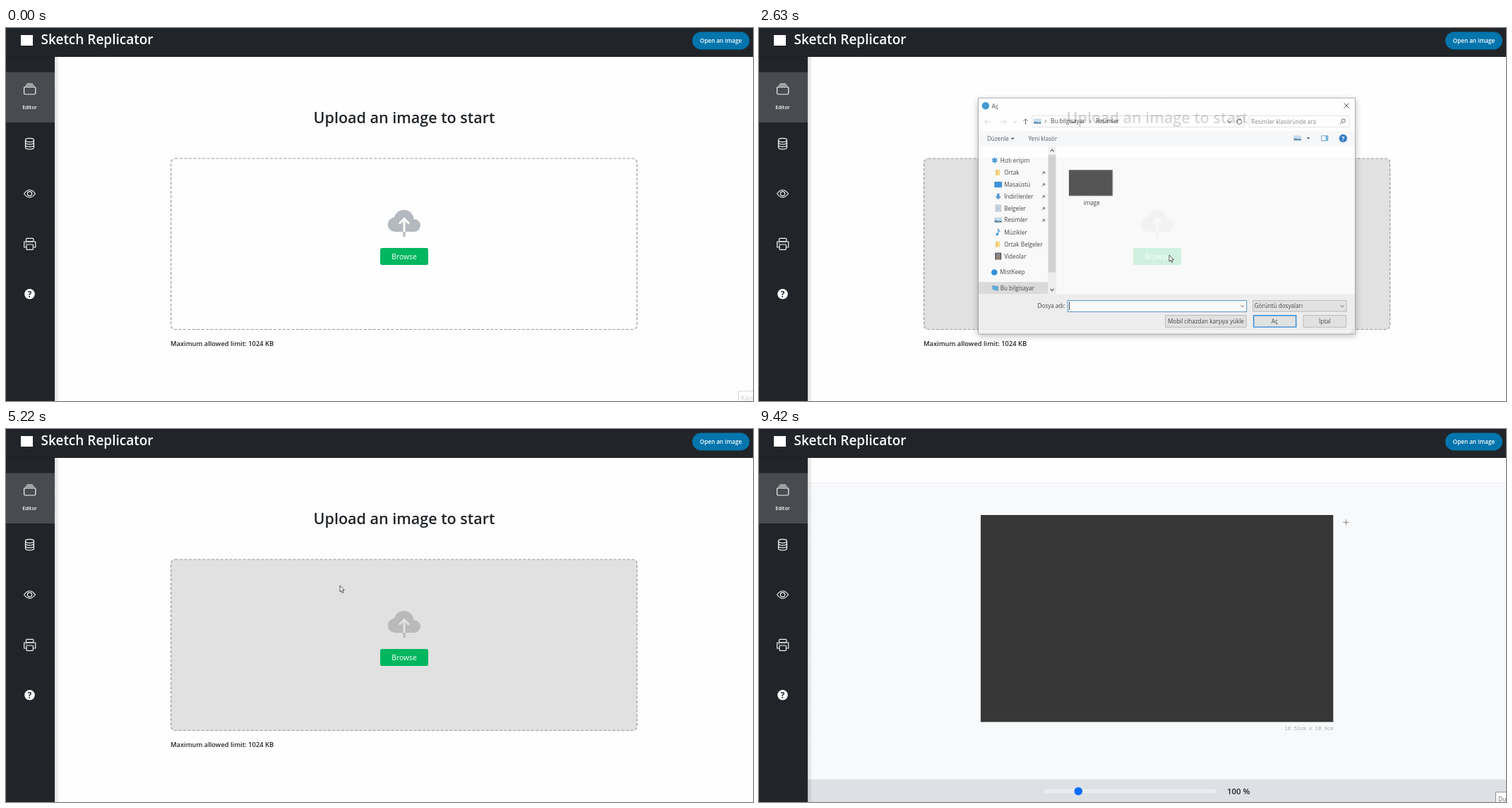
An HTML page with a canvas that plays this animation: 1058 by 529 pixels, repeating every 9500 ms.

```html
<!DOCTYPE html>
<html lang="en">
<head>
<meta charset="utf-8">
<title>Image upload walkthrough</title>
<style>
html, body { margin: 0; width: 100%; height: 100%; overflow: hidden; background: #fefefe; }
canvas { display: block; }
</style>
</head>
<body>
<canvas id="stage" width="1058" height="529"></canvas>
<script>
const stage = document.getElementById('stage').getContext('2d');
const layer = new OffscreenCanvas(1058, 529).getContext('2d');
let ctx = stage;
const LOOP = 9500;
const SANS = '"Open Sans", "Noto Sans", sans-serif';
const MONO = '"Noto Sans Mono", "DejaVu Sans Mono", monospace';
const DARK = '#212529';

const clamp = v => Math.max(0, Math.min(1, v));
const span = (t, a, b) => clamp((t - a) / (b - a));
const smooth = p => p * p * (3 - 2 * p);
const mix = (a, b, p) => a + (b - a) * p;
const within = (t, a, b) => t >= a && t < b;

// ---------- drawing helpers ----------
function rect(x, y, w, h, fill, stroke, radius = 0, line = 1) {
  ctx.beginPath();
  ctx.roundRect(x, y, w, h, radius);
  if (fill) { ctx.fillStyle = fill; ctx.fill(); }
  if (stroke) { ctx.strokeStyle = stroke; ctx.lineWidth = line; ctx.stroke(); }
}
function disc(x, y, r, fill) {
  ctx.beginPath();
  ctx.arc(x, y, r, 0, Math.PI * 2);
  ctx.fillStyle = fill;
  ctx.fill();
}
function path(points, stroke, line = 1, fill) {
  ctx.beginPath();
  points.forEach(([x, y], i) => i ? ctx.lineTo(x, y) : ctx.moveTo(x, y));
  if (fill) { ctx.closePath(); ctx.fillStyle = fill; ctx.fill(); }
  if (stroke) { ctx.strokeStyle = stroke; ctx.lineWidth = line; ctx.stroke(); }
}
// y is the middle of the capitals
function text(str, x, y, size, color, weight = 400, align = 'left', family = SANS) {
  ctx.font = `${weight} ${size}px ${family}`;
  ctx.textAlign = align;
  ctx.fillStyle = color;
  ctx.fillText(str, x, y + size * 0.36);
}
const label = (str, x, y, align, color = '#222') => text(str, x, y, 8.2, color, 400, align);
function chevron(x, y, color = '#555', dx = 2.5, dy = 1.5) {
  path([[x - dx, y - dy], [x, y + dy], [x + dx, y - dy]], color);
}
const chevronRight = (x, y) => path([[x - 1, y - 2.2], [x + 1.2, y], [x - 1, y + 2.2]], '#555');
const triangle = (x, y) => path([[x - 2.3, y - 1], [x + 2.3, y - 1], [x, y + 1.6]], null, 1, '#333');
function arrowIcon(x, y, angle, color) {
  ctx.save();
  ctx.translate(x, y);
  ctx.rotate(angle);
  path([[-4, 0], [4, 0]], color);
  path([[1, -3], [4, 0], [1, 3]], color);
  ctx.restore();
}

// ---------- page frame ----------
function drawChrome() {
  const shade = ctx.createLinearGradient(69, 0, 76, 0);
  shade.addColorStop(0, 'rgba(0,0,0,.13)');
  shade.addColorStop(1, 'rgba(0,0,0,0)');
  ctx.fillStyle = shade;
  ctx.fillRect(69, 41, 7, 488);
  rect(0, 0, 1058, 41, DARK);
  rect(0, 40, 69, 489, DARK);
  rect(0, 40, 69, 1, '#1c2024');
  rect(0, 62.5, 69, 71.5, '#484c50');
  rect(21, 10, 17, 15, '#fff');
  text('Sketch Replicator', 49.5, 16.5, 19, '#fff', 600);
  rect(972, 5.5, 81, 25, '#0275ad', null, 12.5);
  text('Open an Image', 1012.5, 18, 8.1, '#fff', 600, 'center');

  const white = '#f4f4f4';
  rect(25.6, 83.6, 16.2, 10.4, null, white, 1.5, 1.2);
  path([[27.5, 81.3], [40, 81.3]], white, 1.1);
  path([[29.5, 79.2], [38, 79.2]], white, 1.1);
  text('Editor', 33.5, 112, 7.1, '#fff', 600, 'center');

  ctx.strokeStyle = white;
  ctx.lineWidth = 1.2;
  ctx.beginPath();
  ctx.ellipse(33.5, 159, 6, 2.6, 0, 0, Math.PI * 2);
  for (let y = 162.3; y < 171; y += 3.5) {
    ctx.moveTo(39.5, y);
    ctx.ellipse(33.5, y, 6, 2.6, 0, 0, Math.PI);
  }
  ctx.moveTo(27.5, 159); ctx.lineTo(27.5, 169.5);
  ctx.moveTo(39.5, 159); ctx.lineTo(39.5, 169.5);
  ctx.stroke();

  ctx.beginPath();
  ctx.moveTo(25.5, 235);
  ctx.quadraticCurveTo(33.5, 224.5, 41.5, 235);
  ctx.quadraticCurveTo(33.5, 245.5, 25.5, 235);
  ctx.moveTo(36.6, 235);
  ctx.arc(33.5, 235, 3.1, 0, Math.PI * 2);
  ctx.stroke();

  rect(28.5, 298.3, 10.4, 4.5, null, white, 1, 1.2);
  path([[29, 311], [25.7, 311], [25.7, 303], [41.7, 303], [41.7, 311], [38.5, 311]], white, 1.2);
  rect(29, 307, 9.4, 7.3, null, white, 1, 1.2);
  disc(28.4, 305.2, 0.7, white);

  disc(33.5, 377.3, 7.3, '#fff');
  text('?', 33.5, 377.5, 11.5, DARK, 700, 'center');
}

// ---------- upload page ----------
function drawUpload(zoneHover, buttonHover) {
  text('Upload an image to start', 564, 127, 21.5, DARK, 600, 'center');
  const back = zoneHover ? '#e1e1e1' : '#fefefe';
  const cloud = zoneHover ? '#bababa' : '#b3b9be';
  ctx.setLineDash([4, 2.4]);
  rect(233.7, 185, 660, 242.5, back, '#999', 6, 1.2);
  ctx.setLineDash([]);

  disc(551, 278.7, 10.2, cloud);
  disc(563.5, 272, 14, cloud);
  disc(578, 280, 9, cloud);
  rect(551, 276, 27, 13, cloud);
  rect(562.4, 288, 3.2, 8, cloud);
  path([[564, 271], [564, 289]], back, 3);
  path([[557, 277.5], [564, 270.5], [571, 277.5]], back, 3);

  rect(530, 312, 68, 24, buttonHover ? '#009c55' : '#00b65f', null, 2.5);
  text('Browse', 564, 324.5, 10.4, '#fff', 400, 'center');
  text('Maximum allowed limit: 1024 KB', 233, 447.5, 9.3, DARK, 600);
}

// ---------- editor page ----------
function drawEditor() {
  rect(69, 76, 989, 453, '#f8f9fb');
  rect(69, 76, 989, 1, '#eceef1');
  rect(314, 122, 499.3, 293.6, '#363736');
  path([[827.5, 132.3], [835.5, 132.3]], '#888');
  path([[831.5, 128.3], [831.5, 136.3]], '#888');
  text('18.52cm x 10.9cm', 813.5, 424.5, 7.2, '#a3a5a7', 400, 'right', MONO);
  rect(69, 497, 989, 32, '#dde1e6');
  rect(403, 510.7, 245, 6, '#eaedf0', null, 3);
  disc(452.3, 513.7, 5.8, '#0d6efd');
  text('100 %', 663, 514.3, 11.4, DARK, 600);
}

// ---------- file dialog ----------
function pictureIcon(x, y) {
  rect(x - 5, y - 3.5, 10, 7, '#b9d9ee', '#c4cacf', 0, 0.6);
  path([[x - 5, y + 3], [x - 5, y], [x + 1, y + 1.2], [x + 5, y + 0.5], [x + 5, y + 3]], null, 1, '#3f6f93');
}
const treeIcons = {
  star(x, y) {
    for (let i = 0; i < 3; i++) {
      const a = i * Math.PI / 3 + 0.4, c = 4 * Math.cos(a), s = 4 * Math.sin(a);
      path([[x - c, y - s], [x + c, y + s]], '#2f8fdc', 2.2);
    }
  },
  folder(x, y) { rect(x - 3, y - 4, 6, 8, '#fcd978'); rect(x - 3, y - 4, 2, 8, '#eebc50'); },
  desktop(x, y) { rect(x - 5, y - 3.5, 10, 7.5, '#1884dc', '#0b66b5', 0, 0.7); },
  down(x, y) {
    path([[x - 1.8, y - 4], [x + 1.8, y - 4], [x + 1.8, y], [x + 4.5, y], [x, y + 4.5], [x - 4.5, y], [x - 1.8, y]], null, 1, '#3587d6');
  },
  page(x, y) {
    rect(x - 3.5, y - 4.5, 7, 9, '#eef5fb', '#7d93a5', 0, 0.8);
    for (let i = -2; i <= 2; i += 2) path([[x - 2, y + i], [x + 2, y + i]], '#4a83b5', 0.9);
  },
  picture: pictureIcon,
  note(x, y) {
    disc(x - 1.5, y + 3, 1.8, '#1e86d8');
    path([[x, y + 3], [x, y - 4.5], [x + 2.5, y - 1]], '#1e86d8', 1.2);
  },
  film(x, y) { rect(x - 4.5, y - 5, 9, 10, '#3c4148'); rect(x - 2.5, y - 4, 5, 8, '#7b7a86'); rect(x - 2.5, y, 5, 4, '#8d7351'); },
  dot(x, y) { disc(x, y, 4.3, '#0f7fd6'); },
  pc(x, y) { path([[x - 4, y - 4], [x + 4, y - 2.5], [x + 4, y + 3.5], [x - 4, y + 1.5]], '#5e8cab', 0.6, '#3ea0dd'); }
};
const tree = [
  ['Hızlı erişim', 187, 'star', 332, 340],
  ['Ortak', 204.5, 'folder', 336.5, 345.5, true],
  ['Masaüstü', 221.5, 'desktop', 337, 345.5, true],
  ['İndirilenler', 238.5, 'down', 337, 345.5, true],
  ['Belgeler', 255.5, 'page', 337, 345.5, true],
  ['Resimler', 272.5, 'picture', 337, 345.5, true],
  ['Müzikler', 290, 'note', 337, 345.5],
  ['Ortak Belgeler', 307, 'folder', 336.5, 345.5],
  ['Videolar', 324, 'film', 337, 345.5],
  ['MistKeep', 347, 'dot', 331.5, 339.5],
  ['Bu bilgisayar', 370, 'pc', 333, 340]
];

function drawPane(itemState) {
  rect(309, 361, 99, 17, '#d9d9d9');
  for (const [name, y, icon, ix, tx, pinned] of tree) {
    treeIcons[icon](ix, y);
    label(name, tx, y);
    if (pinned) {
      path([[399, y + 3], [402, y]], '#8a8a8a');
      path([[402, y - 2.5], [404.7, y + 0.2], [402.3, y + 2.3], [400, y - 0.2]], null, 1, '#8a8a8a');
    }
  }
  rect(408, 167, 12, 211, '#f0f0f0');
  rect(408.5, 179, 10.5, 168, '#cdcdcd');
  path([[411.5, 174.5], [414, 171.8], [416.5, 174.5]], '#444', 1.2);
  path([[411.5, 370.8], [414, 373.5], [416.5, 370.8]], '#444', 1.2);

  if (itemState === 1) rect(433, 172, 74.5, 83.5, '#e5f3ff');
  if (itemState === 2) rect(433.5, 172.5, 74, 82.5, '#cce8ff', '#99d1ff');
  rect(437.5, 200.5, 63.5, 38, 'rgba(0,0,0,.22)', null, 1);
  rect(438, 201, 62, 36.5, '#353635');
  label('image', 470.5, 248, 'center');
}

function drawDialog(t) {
  ctx.save();
  ctx.shadowColor = 'rgba(0,0,0,.32)';
  ctx.shadowBlur = 9;
  ctx.shadowOffsetY = 2.5;
  rect(308.5, 98, 538, 337.3, '#fff');
  ctx.restore();

  const open = t < 5060;
  if (open) {
    disc(319, 109, 5.3, '#1a83c4');
    path([[830.5, 105.5], [837.5, 112.5]], '#222');
    path([[837.5, 105.5], [830.5, 112.5]], '#222');
  }
  label('Aç', open ? 328 : 313.5, 109.5);

  arrowIcon(322, 132, Math.PI, '#cfcfcf');
  arrowIcon(344, 132, 0, '#cfcfcf');
  chevron(361, 132, '#bbb', 2, 1.2);
  arrowIcon(376, 132, -Math.PI / 2, '#444');
  rect(385.5, 123.5, 302, 16, '#fff', '#dcdcdc');
  path([[674.5, 124], [674.5, 139]], '#dcdcdc');
  pictureIcon(393, 131.5);
  chevronRight(404.5, 131.5);
  label('Bu bilgisayar', 412, 131.5);
  chevronRight(468.5, 131.5);
  label('Resimler', 476, 131.5);
  chevron(667, 132, '#555', 3, 1.7);
  ctx.beginPath();
  ctx.arc(681, 132, 3.5, -0.9, 4.6);
  ctx.strokeStyle = '#444';
  ctx.lineWidth = 1;
  ctx.stroke();
  path([[681, 126.8], [684, 128.8], [681, 130.5]], null, 1, '#444');
  rect(695, 123.5, 143, 16, '#fff', '#dcdcdc');
  label('Resimler klasöründe ara', 698, 132, 'left', '#6d6d6d');
  ctx.beginPath();
  ctx.arc(829.5, 130.5, 2.6, 0, Math.PI * 2);
  ctx.moveTo(827.5, 132.5);
  ctx.lineTo(824.5, 135.5);
  ctx.strokeStyle = '#444';
  ctx.stroke();

  rect(309, 145, 537, 22, '#f5f6f8');
  label('Düzenle', 321, 156, 'left', '#2b3a50');
  triangle(357.5, 156);
  label('Yeni klasör', 380, 156, 'left', '#2b3a50');
  pictureIcon(764, 155.5);
  triangle(779.5, 155.5);
  rect(798.5, 152, 9, 7, '#fff', '#5b89ad');
  rect(804, 152, 3.5, 7, '#5aa6e0');
  disc(829.2, 155.6, 5.7, '#0a61b8');
  text('?', 829.2, 155.8, 8.5, '#fff', 700, 'center');

  const picked = t >= 4860;
  drawPane(picked ? 2 : t >= 3150 && cursorAt(t).x < 507 ? 1 : 0);

  rect(309, 378, 537, 57, '#f0f0f0');
  label('Dosya adı:', 432.5, 395.5, 'right');
  rect(436, 387.5, 255.5, 16, '#fff', '#3a86c8');
  chevron(685.5, 395.5);
  if (picked) label('image', 438, 395.5);
  else if (t < 2640 || Math.floor((t - 2640) / 500) % 2 === 0) rect(438, 389.5, 1, 11.5, '#222');
  rect(700.5, 387.5, 133.5, 15.5, '#e3e3e3', '#b0b0b0');
  label('Görüntü dosyaları', 702.5, 395.5);
  chevron(828, 395.5);
  rect(575.5, 408.5, 115.5, 17, '#e1e1e1', '#b3b3b3');
  label('Mobil cihazdan karşıya yükle', 633.3, 417.3, 'center');
  rect(701.5, 408.7, 60.5, 16.6, '#e1e1e1', '#0f7bd4', 0, 1.5);
  label('Aç', 731.5, 417.3, 'center');
  rect(772.5, 408.5, 61, 17, '#e1e1e1', '#b3b3b3');
  label('İptal', 803, 417.3, 'center');
  for (let i = 0; i < 3; i++)
    for (let j = 0; j <= i; j++) rect(839 + i * 2, 433 - j * 2, 1, 1, '#aaa');
  rect(308.5, 98, 538, 337.3, null, 'rgba(100,100,100,.6)');
}

// The window is composed on its own layer, so that it fades as one piece.
function showDialog(t) {
  const rest = t < 5140 ? (1 - span(t, 2460, 2760)) ** 2 : span(t, 5110, 5200);
  const scale = 1 - 0.04 * rest;
  ctx = layer;
  ctx.clearRect(0, 0, 1058, 529);
  ctx.save();
  ctx.translate(577.5, 266.5);
  ctx.scale(scale, scale);
  ctx.translate(-577.5, -266.5);
  drawDialog(t);
  ctx.restore();
  ctx = stage;
  ctx.globalAlpha = 1 - rest;
  ctx.drawImage(layer.canvas, 0, 0);
  ctx.globalAlpha = 1;
}

function drawFileTip(alpha) {
  ctx.save();
  ctx.globalAlpha = alpha;
  rect(474.5, 233.5, 91, 37, '#fff', '#8a8a8a', 0, 0.8);
  ['Öğe türü: PNG Dosyası', 'Boyutlar: 700 x 412', 'Boyut: 2,04 KB'].forEach((s, i) =>
    text(s, 478, 240.5 + i * 11, 7.8, '#575757'));
  ctx.restore();
}

// ---------- pointer ----------
function cursorAt(t) {
  const move = (x0, y0, x1, y1, a, b) => {
    const p = smooth(span(t, a, b));
    return { x: mix(x0, x1, p), y: mix(y0, y1, p) };
  };
  if (t < 3130) return move(1030, 535, 581, 322, 60, 850);
  if (t < 5870) return move(581, 322, 473, 222, 3130, 3650);
  if (t < 5920) return { x: 473.5, y: 222.5 };
  if (t < 6510) return { x: t < 6150 ? 474 : 475, y: 223 };
  return move(475, 223, 1041, 468, 6480, 7050);
}
function drawArrow(x, y) {
  path([[x, y], [x, y + 9], [x + 2, y + 7.2], [x + 3.5, y + 10.5], [x + 5, y + 9.8], [x + 3.6, y + 6.7], [x + 6.2, y + 6.5]],
    null, 1, '#fff');
  ctx.closePath();
  ctx.strokeStyle = '#111';
  ctx.lineWidth = 0.7;
  ctx.stroke();
}
function drawHand(x, y) {
  ctx.beginPath();
  ctx.moveTo(x - 1, y + 9);
  ctx.lineTo(x - 3.4, y + 6.2);
  ctx.quadraticCurveTo(x - 2.6, y + 4.8, x - 1, y + 6.5);
  ctx.lineTo(x - 1, y + 1.3);
  ctx.quadraticCurveTo(x, y, x + 0.9, y + 1.3);
  ctx.lineTo(x + 0.9, y + 4.5);
  ctx.lineTo(x + 4.4, y + 5.2);
  ctx.quadraticCurveTo(x + 5.8, y + 5.8, x + 5.5, y + 8);
  ctx.lineTo(x + 4.4, y + 12);
  ctx.lineTo(x + 0.5, y + 12);
  ctx.closePath();
  ctx.fillStyle = '#fff';
  ctx.fill();
  ctx.strokeStyle = '#222';
  ctx.lineWidth = 0.7;
  ctx.stroke();
}
function drawSpinner(x, y, t) {
  const ring = ctx.createConicGradient(t / 130, x, y);
  ring.addColorStop(0, '#0f7fd6');
  ring.addColorStop(0.8, '#7cd3fa');
  ring.addColorStop(1, '#0f7fd6');
  ctx.beginPath();
  ctx.arc(x, y, 6, 0, Math.PI * 2);
  ctx.strokeStyle = ring;
  ctx.lineWidth = 3;
  ctx.stroke();
}
function drawPointer(t, overButton) {
  if (t < 60 || t >= 7050) return;
  const { x, y } = cursorAt(t);
  if (within(t, 1740, 1830)) disc(x, y, 8.7, 'rgba(255,250,0,.52)');
  if (within(t, 4860, 4950) || within(t, 5000, 5140)) disc(x - 0.7, y, 8.7, 'rgba(255,250,0,.54)');
  if (within(t, 2030, 2350)) drawSpinner(585, 327, t);
  else if (overButton && t < 2350) drawHand(x, y + 1);
  else drawArrow(x, y);
}

function drawCornerTip(str, x, alpha) {
  if (alpha <= 0) return;
  ctx.save();
  ctx.globalAlpha = alpha;
  rect(x + 0.5, 515, 60, 30, '#fff', '#8c8c8c');
  text(str, x + 4, 525, 8.5, '#666');
  ctx.restore();
}

// ---------- timeline ----------
function drawFrame(t) {
  rect(0, 0, 1058, 529, '#fefefe');
  const { x, y } = cursorAt(t);
  const overZone = x > 233 && x < 894 && y > 185 && y < 428;
  const overButton = x > 530 && x < 598 && y > 312 && y < 336;

  if (t < 5260) drawUpload(overZone, overButton && t < 2500);
  else drawEditor();
  drawChrome();

  if (within(t, 2500, 5200)) showDialog(t);
  if (within(t, 4400, 4860)) drawFileTip(span(t, 4350, 4600));

  drawCornerTip('Kayıt', 1037, 0.35 * (1 - span(t, 40, 90)));
  drawCornerTip('Durdur', 1043, span(t, 8400, 8580));
  drawPointer(t, overButton);
}

function tick() {
  drawFrame(performance.now() % LOOP);
  requestAnimationFrame(tick);
}
tick();
</script>
</body>
</html>
```
